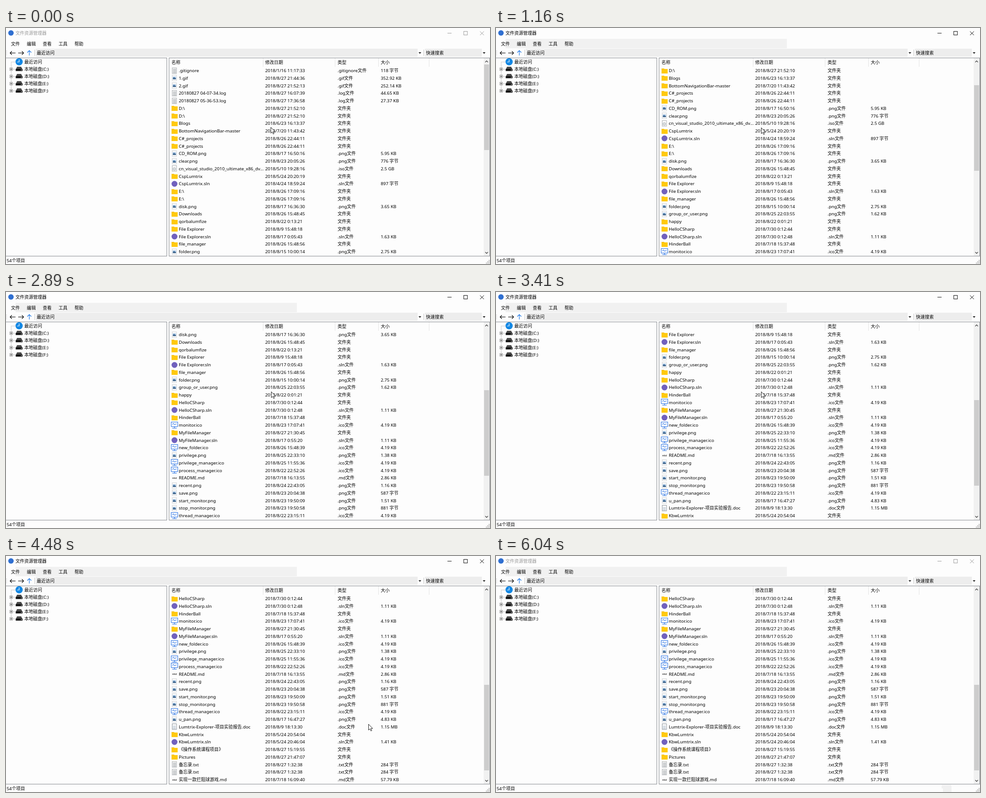
Write an HTML page with a canvas that moves like this. It is 1070 px wide and 524 px high and loops after 6060 ms.

```html
<!DOCTYPE html>
<html lang="zh-CN">
<head>
<meta charset="utf-8">
<title>文件资源管理器</title>
<style>
html, body { margin: 0; width: 100%; height: 100%; overflow: hidden; background: #fdfdfd; }
canvas { display: block; }
</style>
</head>
<body>
<canvas id="stage" width="1070" height="524"></canvas>
<script>
const ctx = document.getElementById('stage').getContext('2d');
const LOOP = 6060, ROW = 16.75, VISIBLE = 25, TOTAL = 54;
const BACK = '#fdfdfd', GREY = '#f1f1f1', FIELD = '#ededed', BORDER = '#82868c';
const SCROLL_TIMES = [670, 1160, 1600, 2060, 2460, 2890, 3410, 3970, 4040];

// name | date in 2018 | size (folders have none)
const files = `.gitignore|1/16 11:17:33|118 字节
1.gif|8/27 21:44:36|352.92 KB
2.gif|8/27 21:52:13|252.14 KB
20180827 04-07-34.log|8/27 16:07:39|44.65 KB
20180827 05-36-53.log|8/27 17:36:58|27.37 KB
D:\\|8/27 21:52:10
D:\\|8/27 21:52:10
Blogs|6/23 16:13:37
BottomNavigationBar-master|7/20 11:43:42
C#_projects|8/26 22:44:11
C#_projects|8/26 22:44:11
CD_ROM.png|8/17 16:50:16|5.95 KB
clear.png|8/23 20:05:26|776 字节
cn_visual_studio_2010_ultimate_x86_dv...|5/10 19:28:16|2.5 GB|iso
CspLumtrix|5/24 20:20:19
CspLumtrix.sln|4/24 18:59:24|897 字节
E:\\|8/26 17:09:16
E:\\|8/26 17:09:16
disk.png|8/17 16:36:30|3.65 KB
Downloads|8/26 15:48:45
qorbalumfize|8/22 0:13:21
File Explorer|8/9 15:48:18
File Explorer.sln|8/17 0:05:43|1.63 KB
file_manager|8/26 15:48:56
folder.png|8/15 10:00:14|2.75 KB
group_or_user.png|8/25 22:03:55|1.62 KB
happy|8/22 0:01:21
HelloCSharp|7/30 0:12:44
HelloCSharp.sln|7/30 0:12:48|1.11 KB
HinderBall|7/18 15:37:48
monitor.ico|8/23 17:07:41|4.19 KB
MyFileManager|8/27 21:30:45
MyFileManager.sln|8/17 0:55:20|1.11 KB
new_folder.ico|8/26 15:48:39|4.19 KB
privilege.png|8/25 22:33:10|1.38 KB
privilege_manager.ico|8/25 11:55:36|4.19 KB
process_manager.ico|8/22 22:52:26|4.19 KB
README.md|7/18 16:13:55|2.86 KB
recent.png|8/24 22:43:05|1.16 KB
save.png|8/23 20:04:38|587 字节
start_monitor.png|8/23 19:50:09|1.51 KB
stop_monitor.png|8/23 19:50:58|881 字节
thread_manager.ico|8/22 23:15:11|4.19 KB
u_pan.png|8/17 16:47:27|4.83 KB
Lumtrix-Explorer-项目实验报告.doc|8/9 18:13:30|1.15 MB
KbwLumtrix|5/24 20:54:04
KbwLumtrix.sln|5/24 20:46:04|1.41 KB
《操作系统课程项目》|8/27 15:19:55
Pictures|8/27 21:47:07
备忘录.txt|8/27 1:32:38|284 字节
备忘录.txt|8/27 1:32:38|284 字节
实现一款拦阻球游戏.md|7/18 16:09:40|57.79 KB`.split('\n').map(line => {
  const [name, date, size, type] = line.split('|');
  return { name, date: '2018/' + date, size, ext: size ? type || name.split('.').pop() : '' };
});

function rect(x, y, w, h, color) {
  ctx.fillStyle = color;
  ctx.fillRect(x, y, w, h);
}

function line(points, color, width = 1) {
  ctx.strokeStyle = color;
  ctx.lineWidth = width;
  ctx.beginPath();
  for (let i = 0; i < points.length; i += 2) ctx.lineTo(points[i], points[i + 1]);
  ctx.stroke();
}

function fill(points, color) {
  ctx.fillStyle = color;
  ctx.beginPath();
  for (let i = 0; i < points.length; i += 2) ctx.lineTo(points[i], points[i + 1]);
  ctx.closePath();
  ctx.fill();
}

function disc(x, y, r, color) {
  ctx.fillStyle = color;
  ctx.beginPath();
  ctx.arc(x, y, r, 0, 7);
  ctx.fill();
}

function box(x, y, w, h, color, width = 1) {
  ctx.strokeStyle = color;
  ctx.lineWidth = width;
  ctx.strokeRect(x, y, w, h);
}

// y is the middle of the text line
function text(str, x, y, color = '#000', font = '9.8px') {
  ctx.font = `${font} "Noto Sans", "Noto Sans CJK SC", "Noto Sans CJK", sans-serif`;
  ctx.fillStyle = color;
  ctx.fillText(str, x, y + 3.6);
}

function page(y, color = '#a9adb1') {
  rect(367, y - 7, 10, 13, '#fafafa');
  box(367.5, y - 6.5, 9.5, 12.5, color);
}

function lines(y) {
  for (let i = -4; i < 5; i += 2) rect(369, y + i, 7, 1, '#a3a8ac');
}

const icons = {
  folder(y) {
    rect(366, y - 5, 6, 2, '#f2b800');
    rect(366, y - 4, 13.5, 10, '#ffc90e');
  },
  text(y) { page(y); lines(y); },
  doc(y) { page(y, '#8c949c'); for (let i = -2; i < 5; i += 2) rect(369, y + i, 6, 1, '#b4c2d0'); },
  image(y) {
    page(y, '#cfd2d5');
    rect(368.5, y - 3, 7.5, 6, '#aecbe8');
    rect(369, y, 6.5, 3, '#44698f');
    rect(370, y - 2, 3, 2, '#5681ad');
  },
  iso(y) {
    page(y);
    disc(372, y + 1, 3.6, '#c3c8cc');
    disc(372, y + 1, 1.2, '#fff');
  },
  sln(y) { disc(372.5, y, 6.5, '#7161bd'); },
  ico(y) {
    box(365.2, y - 7.3, 14.4, 10, '#4484e8', 1.3);
    line([367.5, y - 2, 370, y - 4, 373, y - 1.5, 377, y - 3.5], '#4484e8', 1.2);
    line([372.5, y + 3, 372.5, y + 6], '#4484e8', 1.5);
    line([367.5, y + 6.3, 377.5, y + 6.3], '#4484e8', 1.3);
  },
  md(y) { text('mkd', 367.5, y - 2, '#444', 'bold 4.5px'); }
};
const iconFor = { '': 'folder', png: 'image', gif: 'image', iso: 'iso', sln: 'sln', ico: 'ico', md: 'md', doc: 'doc' };

function titleBar(active) {
  const ink = active ? '#000' : '#999';
  disc(11, 11, 6, '#2f6fd0');
  text('文件资源管理器', 21, 11.5, ink);
  line([976, 11.5, 985, 11.5], ink);
  box(1012, 7.5, 8, 8, ink);
  line([1048, 7.5, 1056.5, 16], ink);
  line([1056.5, 7.5, 1048, 16], ink);
}

function toolbar() {
  ['文件', '编辑', '查看', '工具', '帮助'].forEach((s, i) => text(s, 11 + 35.1 * i, 35));
  for (let y = 50; y < 62; y += 3) rect(1, y, 1, 1, '#aaa');
  line([9, 55.5, 21, 55.5], '#000', 1.1);
  line([13, 51.5, 9, 55.5, 13, 59.5], '#000', 1.1);
  line([27, 55.5, 39, 55.5], '#000', 1.1);
  line([35, 51.5, 39, 55.5, 35, 59.5], '#000', 1.1);
  line([51.5, 50, 51.5, 61], '#1673e6', 1.2);
  line([47, 54.5, 51.5, 50, 56, 54.5], '#1673e6', 1.2);
  rect(63, 48, 1, 14, '#c4c4c4');
  rect(66, 46, 844, 18, FIELD);
  text('最近访问', 68, 55);
  fill([912, 54, 918, 54, 915, 57], '#000');
  rect(923, 48, 1, 14, '#c4c4c4');
  rect(926, 46, 126, 18, FIELD);
  text('快速搜索', 928.5, 55);
  fill([1054, 54, 1060, 54, 1057, 57], '#000');
}

function tree() {
  box(-0.5, 66.5, 356, 440, BORDER);
  ctx.setLineDash([1, 1]);
  line([11.5, 75, 11.5, 139], '#999');
  for (let i = 0; i < 5; i++) line([11, 75.5 + 16 * i, 20, 75.5 + 16 * i], '#999');
  ctx.setLineDash([]);
  disc(29, 75, 8, '#1488e4');
  line([29, 70, 29, 75.5, 24.5, 75.5], '#fff', 1.2);
  text('最近访问', 40.5, 75);
  [...'CDEF'].forEach((drive, i) => {
    const y = 91 + 16 * i;
    rect(8, y - 3, 7, 7, '#fff');
    box(8.5, y - 2.5, 6, 6, '#999');
    line([9.5, y + .5, 13.5, y + .5], '#333');
    line([11.5, y - 1.5, 11.5, y + 2.5], '#333');
    fill([24.5, y - 5, 33.5, y - 5, 36, y, 22, y], '#4a4a4a');
    rect(21.5, y, 15, 4.5, '#111');
    rect(33, y + 1.5, 2, 1.3, '#e8e8e8');
    text(`本地磁盘(${drive}:)`, 40.5, y);
  });
}

function list(top) {
  box(360.5, 66.5, 709, 440, BORDER);
  text('名称', 366, 76);
  text('修改日期', 573, 76);
  text('类型', 733, 76);
  text('大小', 828.5, 76);
  [568, 727, 823, 935].forEach(x => rect(x, 67, 1, 19, '#e3e3e3'));

  files.slice(top, top + VISIBLE).forEach(({ name, date, size, ext }, i) => {
    const y = 94.6 + ROW * i;
    icons[iconFor[ext] || 'text'](Math.round(y));
    text(name, 382, y);
    text(date, 573, y);
    text(ext ? `.${ext}文件` : '文件夹', 733, y);
    if (size) text(size, 828.5, y);
  });

  const track = 410, step = track / TOTAL;
  rect(1056, 67, 13, 439, GREY);
  rect(1057, Math.round(81 + step * top), 11, Math.round(step * VISIBLE), '#cdcdcd');
  line([1059.5, 76, 1062.5, 73, 1065.5, 76], '#444', 1.3);
  line([1059.5, 497.5, 1062.5, 500.5, 1065.5, 497.5], '#444', 1.3);
}

function statusBar() {
  text('54个项目', 1.5, 516.5);
  for (let r = 0; r < 3; r++)
    for (let c = 0; c <= r; c++) rect(1067 - 3 * c, 515 + 3 * r, 2, 2, '#b0b0b0');
}

// Stepped move: each leg runs from its first to its last update.
const legs = [
  { start: 4340, end: 4480, steps: 6, from: [586, 221], to: [801, 373] },
  { start: 4730, end: 4850, steps: 5, from: [801, 373], to: [914, 438] },
  { start: 5030, end: 5450, steps: 13, from: [914, 438], to: [997, 525] }
];

function pointerAt(t) {
  if (t < 20) return [585, 220];
  const leg = legs.filter(l => t >= l.start).pop();
  if (!leg) return [586, 221];
  const gap = (leg.end - leg.start) / (leg.steps - 1);
  const p = Math.min(1, (Math.floor((t - leg.start) / gap) + 1) / leg.steps);
  const eased = p * p * (3 - 2 * p);
  return leg.from.map((v, i) => Math.round(v + (leg.to[i] - v) * eased));
}

function pointer(x, y) {
  ctx.save();
  ctx.translate(x + .5, y + .5);
  const shape = [0, 0, 0, 13, 3, 10.3, 5.2, 15, 7.2, 14, 5.1, 9.5, 9.2, 9.5, 0, 0];
  fill(shape, '#fff');
  line(shape, '#000', .9);
  ctx.restore();
}

function draw(t) {
  const [px, py] = pointerAt(t);
  rect(0, 0, 1070, 524, BACK);
  if (t >= 520) rect(21, 24, 622, 21, GREY);
  titleBar(t >= 520 && t < 6040);
  toolbar();
  tree();
  list(3 * SCROLL_TIMES.filter(s => t >= s).length);
  statusBar();
  if (py > 500) fill([985, 508, 1007, 508, 1007, 524, 988, 524, 988, 516, 985, 516], GREY);
  pointer(px, py);
}

function frame() {
  draw(performance.now() % LOOP);
  requestAnimationFrame(frame);
}
frame();
</script>
</body>
</html>
```
